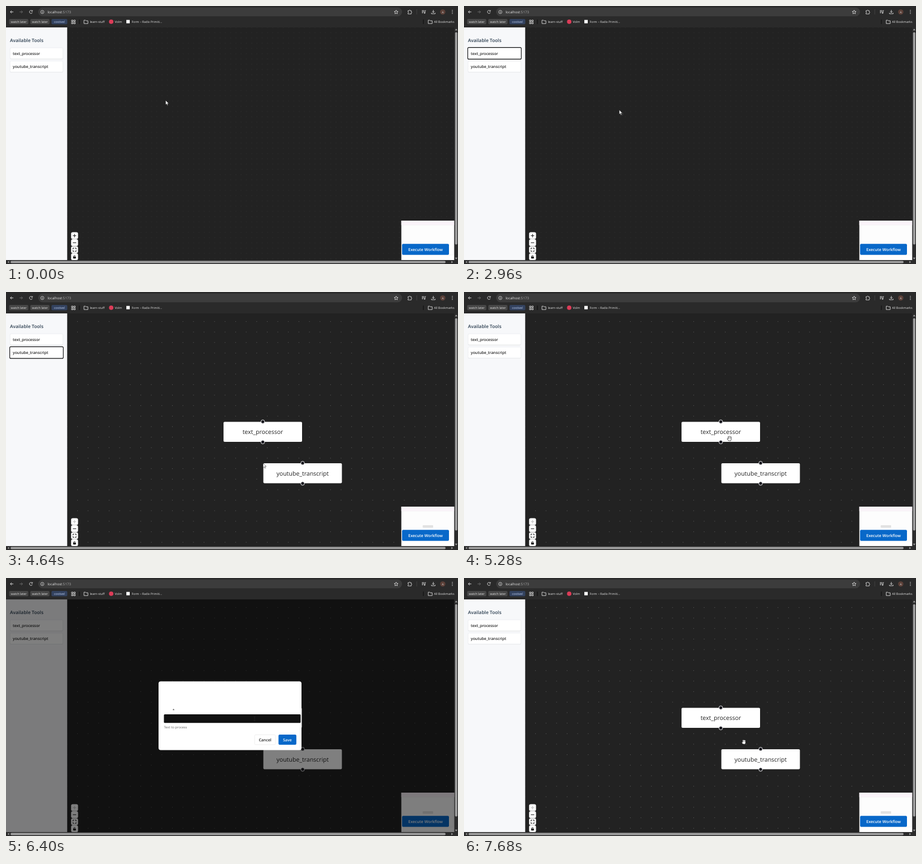
These frames come from a looping animation (800x458 px, 8000 ms). An HTML page:

```html
<!DOCTYPE html>
<html lang="en">
<head>
<meta charset="utf-8">
<title>Workflow builder</title>
<style>
  html, body { margin: 0; width: 100%; height: 100%; overflow: hidden; background: #222; }
  svg { display: block; width: 800px; height: 458px; }
  text { font-family: "Open Sans", "Noto Sans", sans-serif; text-rendering: geometricPrecision; white-space: pre; }
  .line { fill: none; stroke: #dedede; stroke-width: .9; }
  .bold { font-weight: 600; }
  .mid { text-anchor: middle; }
</style>
</head>
<body>
<svg id="stage" viewBox="0 0 800 458"></svg>
<script>
const rect = (x, y, w, h, fill, r = 0, more = '') =>
  `<rect x="${x}" y="${y}" width="${w}" height="${h}" rx="${r}" fill="${fill}" ${more}/>`;
const circle = (x, y, r, fill, more = '') => `<circle cx="${x}" cy="${y}" r="${r}" fill="${fill}" ${more}/>`;
const text = (x, y, size, fill, words, cls = '') =>
  `<text x="${x}" y="${y}" font-size="${size}" fill="${fill}" class="${cls}">${words}</text>`;
const line = (d, more = '') => `<path class="line" d="${d}" ${more}/>`;
const group = (id, content) => `<g id="${id}">${content}</g>`;

const folder = x => line(`M${x} 25.2h2.6l1 1h3.4v5h-7z`);

const chip = (x, w, label, fill = '#474747', color = '#e3e3e3') =>
  rect(x, 23, w, 9.6, fill, 2) + text(x + w / 2, 29.8, 5.45, color, label, 'mid');

const browser = () =>
  rect(0, 0, 800, 38, '#2a2a2a') +
  rect(57, 2.7, 644, 15.6, '#3c3c3c', 7.8) +
  line('M13 10.5H7.8M10.2 8l-2.5 2.5 2.5 2.5') +
  line('M24 10.5h5.2M26.8 8l2.5 2.5-2.5 2.5', 'style="stroke:#6b6b6b"') +
  line('M46.4 9a2.7 2.7 0 1 0 .3 2.4M46.8 7.3v2h-2') +
  circle(64.3, 10.6, 2.9, 'none', 'stroke="#dedede" stroke-width=".8"') +
  line('M64.3 10.2v2M64.3 8.8v.7') +
  text(73.5, 12.8, 6.15, '#e6e6e6', 'localhost<tspan fill="#b0b0b0">:5173</tspan>') +
  line('M690.5 7.3l1 2.2 2.4.3-1.8 1.6.5 2.4-2.1-1.2-2.1 1.2.5-2.4-1.8-1.6 2.4-.3z') +
  line('M711.5 8.3h2a1 1 0 0 1 2 0h1.7v2a1 1 0 0 1 0 2v1.8h-5.7v-1.8a1 1 0 0 0 0-2z') +
  line('M727 6v9', 'style="stroke:#444"') +
  line('M736 8.2h4.4M736 10.1h4.4M736 12h2.6M741.7 12.4V8.1h1.5') +
  circle(740.9, 12.4, 1.1, '#dedede') +
  line('M756.3 7v4.6M754.2 9.7l2.1 2 2.1-2M753 12v1.8h6.6V12') +
  circle(773, 10.6, 4.7, '#5b4038') + text(773, 12.5, 5, '#ddd', 'A', 'mid') +
  [7.8, 10.5, 13.2].map(y => circle(790, y, .75, '#dedede')).join('') +
  chip(5.5, 34, 'watch later') + chip(43, 34, 'watch later') +
  chip(80.5, 28, 'costivel', '#33425f', '#c5d6f7') +
  [116, 120].map(x => [25, 29].map(y => line(`M${x} ${y}h2.5v2.5h-2.5z`)).join('')).join('') +
  rect(129.3, 24, 1.2, 8, '#111') + rect(738, 24, 1.2, 8, '#111') +
  folder(138) + text(148.5, 29.8, 5.4, '#e3e3e3', 'learn-stuff') +
  circle(186.2, 27.8, 3.9, '#dc3c58') + text(192.5, 29.8, 5.4, '#e3e3e3', 'Volm') +
  rect(213, 24.7, 6, 6, '#fff') + text(222.5, 29.8, 5.3, '#e3e3e3', 'Form – Radix Primiti...') +
  folder(747.3) + text(757.5, 29.8, 5.4, '#e3e3e3', 'All Bookmarks');

const tool = (y, label) =>
  rect(7, y + .6, 94, 20, '#e3e5e8', 2) +
  rect(7.2, y + .2, 93.6, 19.6, '#fff', 2, 'stroke="#e3e5e8" stroke-width=".5"') +
  text(12, y + 12.8, 6.85, '#222', label, 'bold');
const outline = (id, y) =>
  group(id, rect(6.6, y - .4, 94.8, 20.8, 'none', 2, 'stroke="#111" stroke-width="1.1"'));

const sidebar = () =>
  rect(0, 38, 108.3, 413, '#f7f8fa') +
  text(7, 63.7, 8.3, '#2c3e50', 'Available Tools', 'bold') +
  tool(74, 'text_processor') + tool(97.5, 'youtube_transcript') +
  outline('textFocus', 74) + outline('tubeFocus', 97.5);

const dots = (id, gap, x, y, r, fill) =>
  `<pattern id="${id}Dots" x="${x - gap / 2}" y="${y - gap / 2}" width="${gap}" height="${gap}" patternUnits="userSpaceOnUse">` +
  circle(gap / 2, gap / 2, r, fill) + '</pattern>' +
  group(id, rect(108.3, 38, 685.2, 413, `url(#${id}Dots)`));

const handle = (x, y) => circle(x, y, 3.2, '#14141c', 'stroke="#fff" stroke-width=".9"');
const node = (id, x, y, label) => group(id,
  rect(x, y, 139, 35.5, '#fff', 2) + handle(x + 69.5, y - .3) + handle(x + 69.5, y + 35.9) +
  text(x + 69.5, y + 21.5, 10.5, '#222', label, 'mid'));

const controls = () =>
  [0, 1, 2, 3].map(i => rect(115.2, 401.6 + i * 12.5, 12.3, 12.2, '#fdfdfd', 3)).join('') +
  '<path id="plus" d="M118.3 407.7h6M121.3 404.7v6" stroke-width="1"/>' +
  '<path d="M118.3 420.2h6" stroke="#111"/>' +
  '<path d="M118.6 431.8v-2h2M122.1 429.8h2v2M124.1 433.6v2h-2M120.6 435.6h-2v-2" fill="none" stroke="#111"/>' +
  rect(118.9, 444.7, 4.8, 3.5, '#111', .6) +
  '<path d="M120 445v-1a1.3 1.3 0 0 1 2.6 0" fill="none" stroke="#111" stroke-width=".8"/>';

const minimap = () =>
  rect(699.7, 381, 93.8, 70, '#fff') + rect(699.7, 381, 93.8, 8, '#fbf4fa') +
  rect(701.5, 389, 90, 53, '#fdfdfd', 0, 'stroke="#eee" stroke-width=".6"') +
  group('mapNode', rect(737.5, 414, 18.5, 4.6, '#e2e2e2', 1)) +
  rect(701, 422.3, 83, 19.4, '#0868c9', 2) +
  text(742.5, 435, 7.1, '#fff', 'Execute Workflow', 'bold mid');

const dialog = () => group('dialog',
  rect(0, 38, 793.5, 413, '#000', 0, 'opacity=".5"') +
  rect(270, 183.5, 253, 122, '#fff', 4) +
  text(294.8, 237, 6.5, '#333', '*') +
  rect(279.5, 242, 242, 15.2, '#111', 1.5) +
  '<text id="url" x="283" y="251.7" font-size="6.26" fill="#fff" style="font-family:\'Liberation Sans\',Arial,sans-serif">https://www.youtube.com/watch?v=GOIYREEANEM</text>' +
  text(279.5, 266.5, 5.86, '#666', 'Text to process') +
  rect(440, 278.3, 37, 17.6, '#fff', 2, 'stroke="#e8e8e8" stroke-width=".7"') +
  text(458.5, 289.8, 6.95, '#222', 'Cancel', 'bold mid') +
  rect(482.3, 278, 31.6, 18, '#0868c9', 2) +
  group('saveFocus',
    rect(481.8, 277.5, 32.6, 19, 'none', 2.5, 'stroke="#101828" stroke-width="1.1"') +
    rect(482.9, 278.6, 30.4, 16.8, 'none', 1.8, 'stroke="#fff" stroke-width=".9"')) +
  text(498, 289.8, 6.9, '#fff', 'Save', 'bold mid'));

const scrollbars = () =>
  rect(0, 451, 800, 7, '#2c2c2c') + rect(793.5, 38, 6.5, 420, '#2c2c2c') +
  rect(8, 452.6, 770, 4, '#9f9f9f', 2) + rect(794.8, 46.5, 4, 377, '#9f9f9f', 2) +
  '<path fill="#9f9f9f" d="M2.6 454.6l3-2v4zM791.2 454.6l-3-2v4zM796.8 40.3l-2.2 3h4.4zM796.8 449.8l-2.2-3h4.4z"/>';

const arrow = '<path d="M0 0v7.8l1.8-1.6 1.2 2.7 1.3-.6-1.2-2.6h2.5z" fill="#fff" stroke="#111" stroke-width=".5"/>';
const hand = tip => `<path d="M-1.8 3.8L-3.6.7q.2-1.2 1.6 0V${-tip}q.7-1 1.4 0 .7-1.4 1.5 0 .8-.9 1.4.2.9-.6 1.2.4V1.5L2.5 4.2z" fill="#fff" stroke="#111" stroke-width=".7"/>`;
const cursors = {
  arrow,
  drag: arrow + '<path d="M2 5.4h4.2v3.4H2z" fill="none" stroke="#777" stroke-width=".6" stroke-dasharray="1 .8"/>',
  grab: hand(3.2) + '<path d="M-.6-2.4v2.6M.9-2.4v2.6M2.3-2v2.2" stroke="#333" stroke-width=".45"/>',
  pointer: '<path d="M-.7 5V-2.6q.8-1 1.6 0v2.8l3 .8q.7.4.5 1.2L3.6 6H-.2l-2.8-3.2q.3-1.3 2.3.2" fill="#fff" stroke="#111" stroke-width=".6"/>',
  beam: '<path d="M-1.5-3.5h3M0-3.5v7M-1.5 3.5h3" fill="none" stroke="#222" stroke-width=".8"/>',
};

const stage = document.getElementById('stage');
stage.innerHTML =
  rect(0, 0, 800, 458, '#222') +
  dots('fine', 9.33, 117.6, 47.3, .4, '#505050') + dots('coarse', 18.66, 145.2, 52.4, .55, '#707070') +
  sidebar() +
  node('textNode', 385, 230.5, 'text_processor') + node('tubeNode', 455.5, 304, 'youtube_transcript') +
  controls() + minimap() + dialog() + scrollbars() + browser() +
  group('cursor', Object.entries(cursors).map(([kind, art]) => group(kind, art)).join(''));

// time, x, y, cursor shape from then on
const path = [
  [0, 282.5, 167.5, 'arrow'], [320, 54.5, 91.5, 'grab'], [2640, 54.5, 91.5, 'drag'],
  [3120, 385, 231, 'drag'], [3440, 385, 231, 'arrow'], [3760, 54, 109, 'drag'],
  [4000, 351, 262, 'drag'], [4480, 455, 304, 'drag'], [4640, 455, 304, 'arrow'],
  [4800, 474, 270, 'grab'], [5040, 474, 270, 'grab'], [5280, 469.5, 260, 'grab'],
  [5440, 469, 260, 'beam'], [5920, 469, 260, 'beam'], [6400, 440, 250, 'beam'],
  [7200, 440, 250, 'beam'], [7440, 493, 288.5, 'pointer'], [7680, 495, 291, 'grab'], [8000, 495, 291, 'grab'],
];

const show = (id, on) => document.getElementById(id).style.display = on ? '' : 'none';

function draw(now) {
  const t = Math.floor(now % 8000 / 80) * 80;
  const within = (from, to = 8000) => t >= from && t < to;

  show('fine', t < 3440);
  for (const id of ['coarse', 'textNode', 'mapNode']) show(id, t >= 3440);
  document.getElementById('plus').setAttribute('stroke', t < 3440 ? '#111' : '#bbb');
  show('textFocus', within(2720, 3760));
  show('tubeFocus', within(3760, 5120));
  show('tubeNode', t >= 4640);
  show('dialog', within(5440, 7680));
  show('url', t >= 6720);
  show('saveFocus', t >= 7440);

  const i = path.findIndex(key => key[0] > t);
  const [t0, x0, y0, shape] = path[i - 1], [t1, x1, y1] = path[i];
  const k = (t - t0) / (t1 - t0);
  document.getElementById('cursor').setAttribute('transform', `translate(${x0 + (x1 - x0) * k} ${y0 + (y1 - y0) * k})`);
  for (const kind in cursors) show(kind, kind === shape);
}

const start = performance.now();
function tick() {
  draw(performance.now() - start);
  requestAnimationFrame(tick);
}
tick();
</script>
</body>
</html>
```
